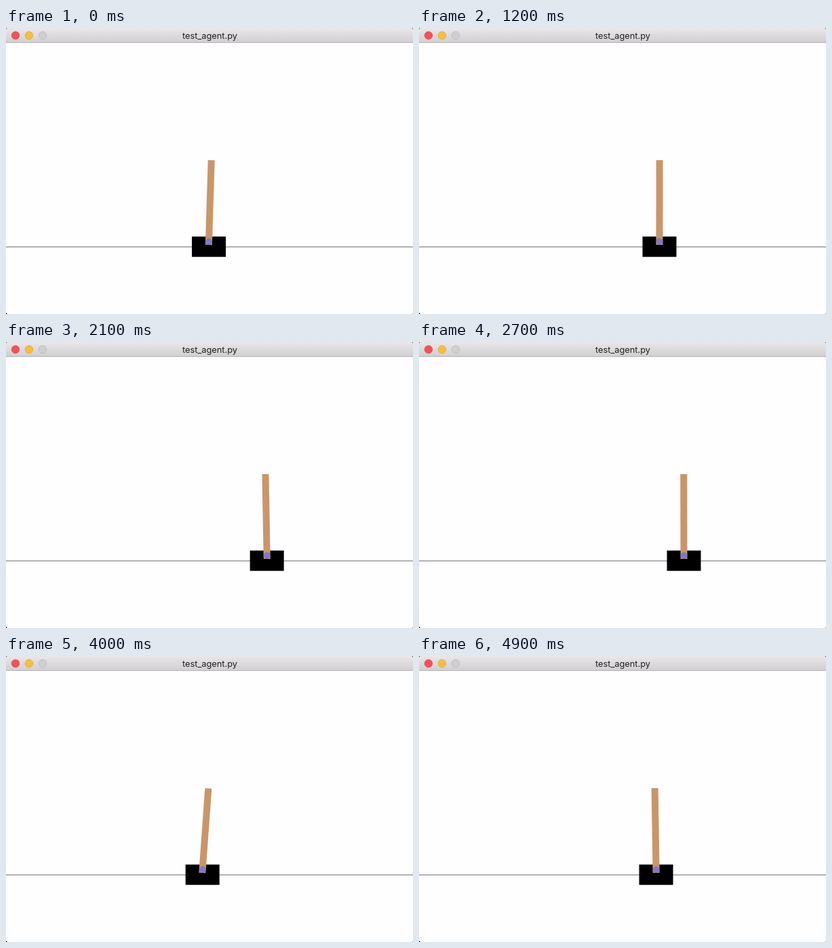
Write an HTML page that moves like this. It is 600 px wide and 422 px high and loops after 5000 ms.

```html
<!DOCTYPE html>
<html lang="en">
<head>
<meta charset="utf-8">
<title>Cart and pole</title>
<style>
  html, body { margin: 0; width: 100%; height: 100%; overflow: hidden; background: #000; }
  svg { display: block; width: 100vw; height: 100vh; }
  text { font: 12.8px Inter, Roboto, sans-serif; fill: #222122; text-anchor: middle; }
</style>
</head>
<body>
<svg viewBox="0 0 600 422">
  <defs>
    <linearGradient id="bar" x1="0" y1="0" x2="0" y2="1">
      <stop offset="0" stop-color="#e9e7e9"/>
      <stop offset="1" stop-color="#d0ced0"/>
    </linearGradient>
  </defs>
  <path d="M0 21H600V421L599 422H2L0 420Z" fill="#fefdff"/>
  <path d="M0 22V2Q0 0 2 0H598Q600 0 600 2V22Z" fill="url(#bar)"/>
  <path d="M0 21.5H600" stroke="#b5b3b5"/>
  <g stroke-width=".7">
    <circle cx="14" cy="11" r="5.8" fill="#f0525a" stroke="#dc444c"/>
    <circle cx="34" cy="11" r="5.8" fill="#f6bd42" stroke="#dda534"/>
    <circle cx="54" cy="11" r="5.8" fill="#d0ced0" stroke="#b9b7b9"/>
  </g>
  <text x="300.5" y="16">test_agent.py</text>
  <path d="M0 323H600" stroke="#6b6a6b" stroke-width="1.2"/>
  <g id="cart">
    <rect x="-25" y="307.7" width="50" height="30" fill="#000"/>
    <rect id="pole" x="-5" y="195" width="10" height="125" fill="#c8966a"/>
    <circle cy="315.2" r="4.9" fill="#8078ca"/>
  </g>
</svg>
<script>
  const LOOP = 5000, STEP = 100, RESET = 35;
  const cart = document.getElementById('cart');
  const pole = document.getElementById('pole');

  // Smooth curve through evenly spaced points.
  function spline(points, t) {
    const i = Math.floor(t), u = t - i;
    const at = k => points[Math.min(Math.max(k, 0), points.length - 1)];
    const [a, b, c, d] = [-1, 0, 1, 2].map(k => at(i + k));
    return b + u / 2 * (c - a + u * (2 * a - 5 * b + 4 * c - d + u * (3 * (b - c) + d - a)));
  }

  // First run: the cart drifts right while the pole sways and settles (lean in radians).
  const path = [299, 302, 323, 354.5, 372.5, 383.2, 387.2, 392, 400.7, 407.6];
  const sway = [0.031, 0.032, -0.028, -0.008, 0.004, 0];
  const drift = s => ({ x: spline(path, s / 4), lean: spline(sway, s / 8) });

  // Second run: the cart rolls left, then turns and chases the falling pole.
  const chase = s => ({
    x: 299 - 2.5 * s + 10.8 * Math.log(1 + Math.exp(s - 6.08)),
    lean: 0.028 + 0.044 * Math.cos((s - 5) / 9 * Math.PI)
  });

  function draw(ms) {
    const step = Math.floor((ms % LOOP) / STEP);
    const { x, lean } = step < RESET ? drift(step) : chase(step - RESET);
    cart.setAttribute('transform', `translate(${x.toFixed(2)} 0)`);
    pole.setAttribute('transform', `rotate(${(lean * 180 / Math.PI).toFixed(3)} 0 315.2)`);
  }

  const start = performance.now();
  function tick() {
    draw(performance.now() - start);
    requestAnimationFrame(tick);
  }
  tick();
</script>
</body>
</html>
```
